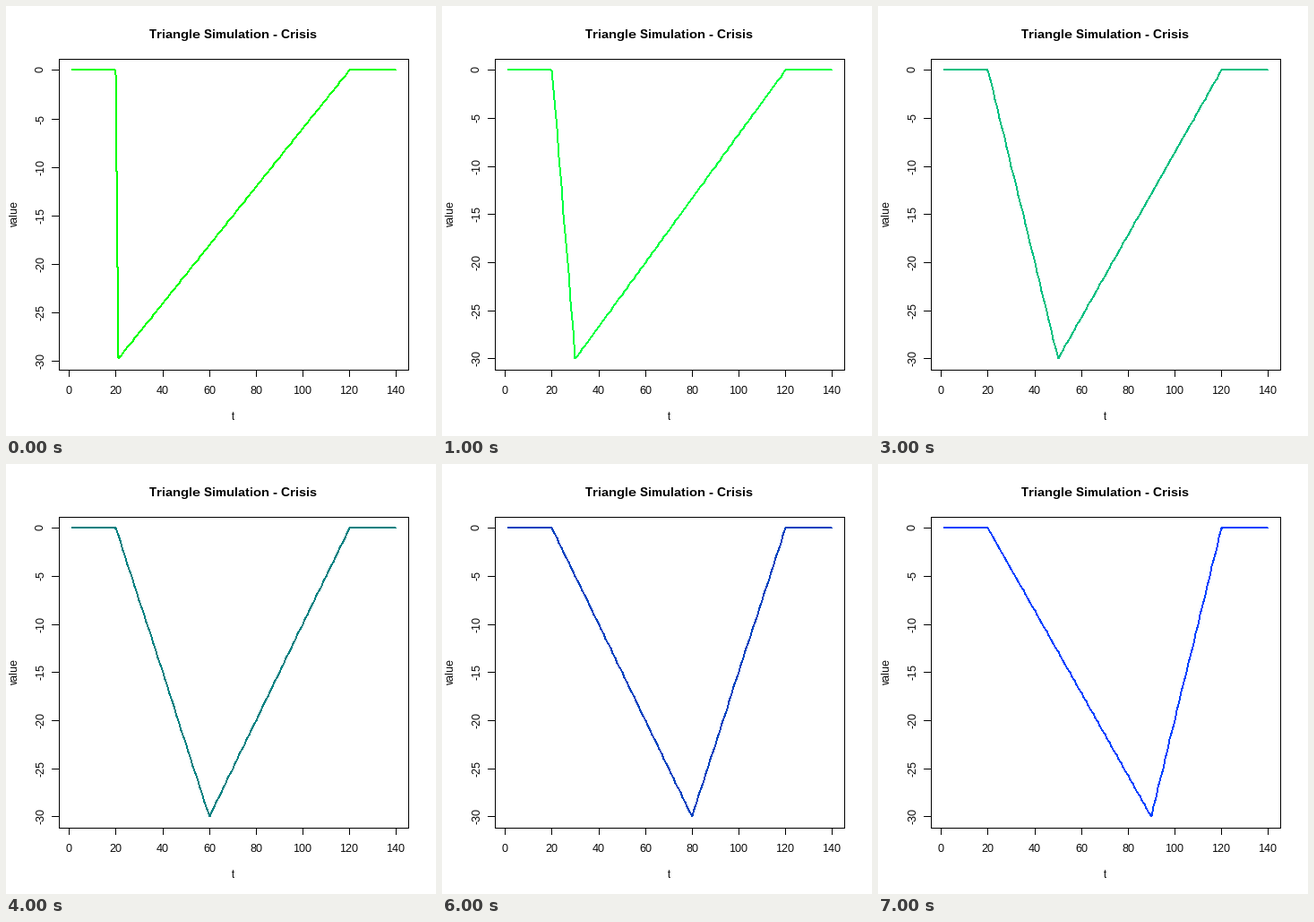
Animation, 480 px wide and 480 px high, one loop 8000 ms. Source, as a matplotlib script:

```python
import numpy as np
import matplotlib as mpl
import matplotlib.pyplot as plt
from matplotlib.animation import FuncAnimation
from matplotlib.patches import Rectangle

SIZE = 480
LINE = 14.4  # height of one margin line in pixels
LEFT, RIGHT = 4.1 * LINE, SIZE - 2.1 * LINE
TOP, BOTTOM = 4.1 * LINE, SIZE - 5.1 * LINE
PAD = 0.04 / 1.08  # share of the plot left free on each side
TICK = 7
STEPS = 8

mpl.rcParams.update({
    "font.family": "Liberation Sans",
    "text.hinting": "native",
    "text.hinting_factor": 1,
    "path.simplify": False,
})

fig = plt.figure(figsize=(SIZE / 72, SIZE / 72), dpi=72, facecolor="white")
ax = fig.add_axes([0, 0, 1, 1])
ax.set(xlim=(0, SIZE), ylim=(SIZE, 0))
ax.axis("off")

t = np.arange(1, 141)


def px(value):
    width = RIGHT - LEFT
    return np.floor(LEFT + width * (PAD + (value - 1) / 139 / 1.08))


def py(value, low):
    height = BOTTOM - TOP
    return np.floor(TOP + height * (PAD + value / low / 1.08))


def stroke(xs, ys):
    return ax.plot(xs, ys, color="black", lw=1, aa=False, snap=True,
                   solid_capstyle="butt")[0]


def label(x, y, text, size=12, **style):
    return ax.text(x, y, text, size=size, ha="center", va="baseline",
                   rotation_mode="anchor", **style)


def harden(image, dpi):
    """Turn soft edges into whole pixels."""
    image[..., 3] = image[..., 3] > 0.5
    return image, 0, 0


def crisis(step):
    """Values of a drop at t=20 that recovers by t=120."""
    turn = max(21, 20 + 10 * step)
    low = -29.7 if step == 0 else -30
    return np.interp(t, [20, turn, 120], [0, low, 0])


x0, x1, y0, y1 = map(int, (LEFT, RIGHT, TOP, BOTTOM))
ax.add_patch(Rectangle((x0, y0), x1 - x0, y1 - y0, fill=False,
                       ec="black", lw=1, aa=False, snap=True))

for tick in range(0, 141, 20):
    x = px(tick)
    stroke([x, x], [y1, y1 + TICK])
    label(x, 433, str(tick))

y_values = range(0, -31, -5)
y_ticks = [(stroke([x0 - TICK - 1, x0], [0, 0]),
            label(42, 0, str(v), rotation=90)) for v in y_values]

label(254, 36, "Triangle Simulation - Crisis", 14.4, weight="bold")
label(253.5, 462, "t")
label(13, 232, "value", rotation=90)

curve, = ax.plot([], [], lw=2, snap=False, solid_capstyle="round",
                 solid_joinstyle="round", agg_filter=harden)


def draw(step):
    values = crisis(step)
    low = values.min()
    # just short of the pixel centre, so flat parts fill the row above
    curve.set_data(px(t) + 0.45, py(values, low) + 0.45)
    curve.set_color((0, 1 - step // 2 / 4, (step + 1) // 2 / 4))
    for value, (mark, text) in zip(y_values, y_ticks):
        y = py(value, low)
        mark.set_ydata([y, y])
        text.set_y(y)
    return [curve]


anim = FuncAnimation(fig, draw, frames=STEPS, init_func=lambda: draw(0),
                     interval=1000, repeat=True, repeat_delay=0)
plt.show()
```
